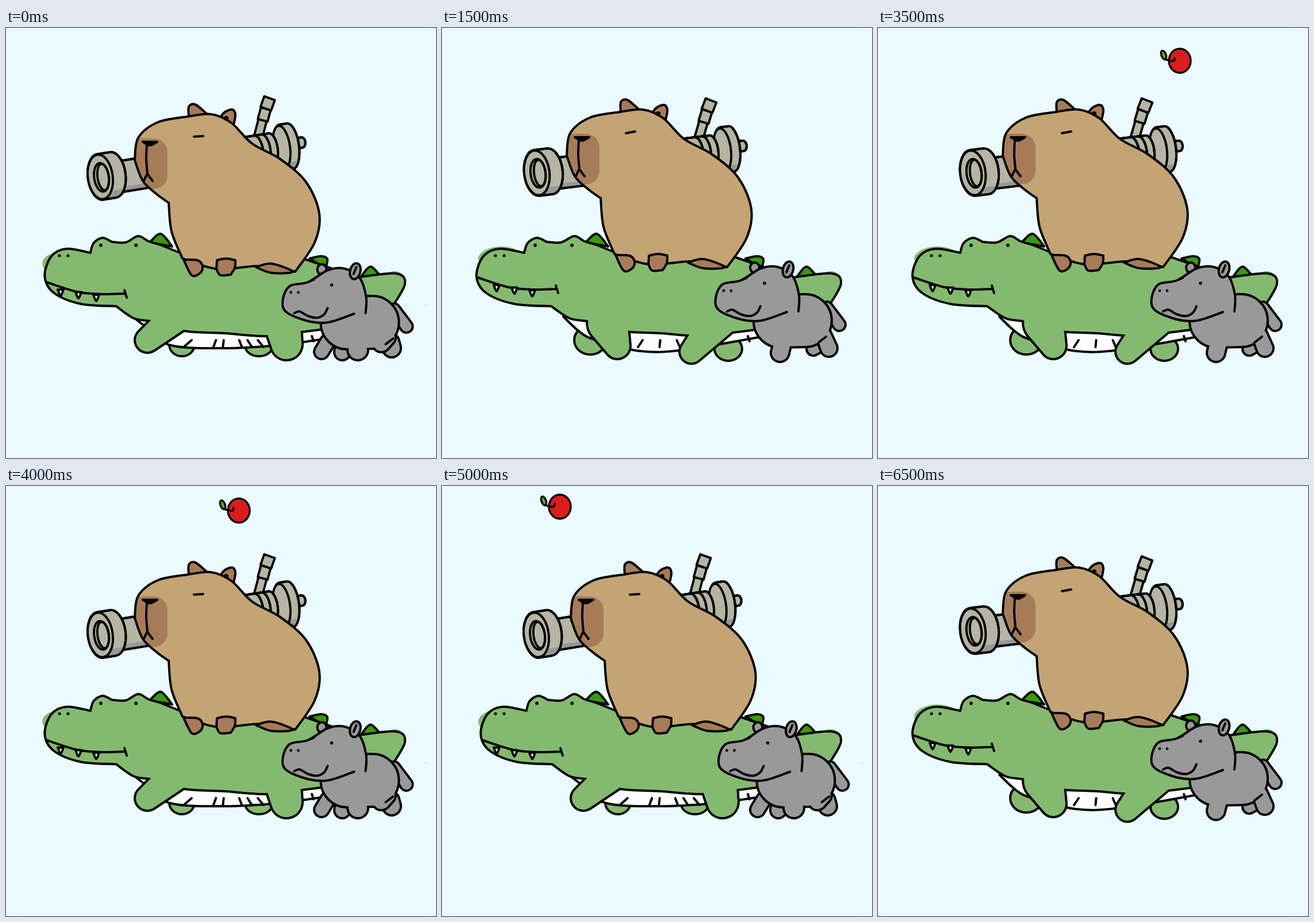
An HTML page with a canvas for the animation above (7 s loop, 748 by 748 pixels).

```html
<!DOCTYPE html>
<html lang="en">
<head>
<meta charset="utf-8">
<title>Animal parade</title>
<style>
html, body { margin: 0; width: 100%; height: 100%; overflow: hidden; background: #ebfaff; }
canvas { display: block; width: 748px; height: 748px; }
</style>
</head>
<body>
<canvas id="stage" width="748" height="748"></canvas>
<script>
const ctx = document.getElementById('stage').getContext('2d');
const SKY = '#ebfaff', INK = '#050505', TAN = '#c4a474', BROWN = '#a67c58';
const GREEN = '#84ba6f', SPIKE = '#3a9a0c', GREY = '#999999', METAL = '#b5b5a3', SHADE = '#98989a';
const STEP = 500, LOOP = 7000, PEN = 4;

// Two walking poses; limbs are x, y, radius at both ends.
const poses = [{
  shift: [7, 8], eyeLift: -2, sway: 10, mouth: 8,
  gun: [0.98, -0.036, 0.02, 1, -2.7, 13],
  belly: '216 499 246 522 287 552 380 557 470 552 560 540',
  ticks: [316, 363, 378, 408, 424, 443],
  farLegs: [[306, 551, 22, 20], [440, 553, 24, 18]],
  legs: [[292, 505, 28, 246, 543, 22], [482, 520, 32, 488, 550, 28]],
  hippo: [5.5, 3],
  hippoFar: [[560, 545, 13, 549, 563, 13], [672, 545, 12, 671, 557, 16], [586, 550, 13, 585, 564, 14]],
  hippoLegs: [[611, 545, 17, 612, 560, 18], [662, 538, 16, 653, 548, 16]]
}, {
  shift: [0, 0], eyeLift: 0, sway: 0, mouth: 0,
  gun: [1, 0, 0, 1, 0, 0],
  belly: '211 502 240 529 268 543 345 562 420 560 556 537',
  ticks: [345, 379, 411],
  farLegs: [[258, 543, 28, 25], [498, 558, 24, 21]],
  legs: [[288, 513, 36, 305, 553, 23], [482, 508, 32, 434, 563, 21]],
  hippo: [0, 0],
  hippoFar: [[655, 555, 10, 646, 558, 12]],
  hippoLegs: [[594, 540, 16, 588, 565, 16], [664, 535, 14, 673, 557, 15]]
}];

// Smooth curve through points; "/" marks a corner.
function curve(text, warp = p => p) {
  const path = new Path2D();
  let last = null;
  for (const part of text.split('/')) {
    const n = part.trim().split(/\s+/).map(Number);
    const p = last ? [last] : [];
    for (let i = 0; i < n.length; i += 2) p.push(warp([n[i], n[i + 1]]));
    if (!last) path.moveTo(...p[0]);
    for (let i = 0; i < p.length - 1; i++) {
      const a = p[i - 1] || p[i], b = p[i], c = p[i + 1], d = p[i + 2] || c;
      path.bezierCurveTo(b[0] + (c[0] - a[0]) / 6, b[1] + (c[1] - a[1]) / 6,
        c[0] - (d[0] - b[0]) / 6, c[1] - (d[1] - b[1]) / 6, c[0], c[1]);
    }
    last = p[p.length - 1];
  }
  return path;
}

function paint(path, color) {
  ctx.fillStyle = color;
  ctx.fill(path);
  ctx.stroke(path);
}

function shape(text, color, warp) {
  const path = curve(text, warp);
  path.closePath();
  paint(path, color);
}

function line(...texts) {
  for (const text of texts) ctx.stroke(curve(text));
}

function ellipse(x, y, rx, ry, turn = 0) {
  const path = new Path2D();
  path.ellipse(x, y, rx, ry, turn, 0, 7);
  return path;
}

function dot(x, y, r, color = INK) {
  ctx.fillStyle = color;
  ctx.fill(ellipse(x, y, r, r));
}

// Outline around two circles, grown by "pad".
function hull([x1, y1, r1, x2, y2, r2], pad = 0) {
  const turn = Math.atan2(y2 - y1, x2 - x1);
  const open = Math.acos((r1 - r2) / Math.hypot(x2 - x1, y2 - y1));
  const path = new Path2D();
  path.arc(x1, y1, r1 + pad, turn + open, turn - open + 2 * Math.PI);
  path.arc(x2, y2, r2 + pad, turn - open, turn + open);
  path.closePath();
  return path;
}

// Body and limbs joined into one silhouette.
function creature(body, limbs, color) {
  ctx.fillStyle = INK;
  for (const limb of limbs) ctx.fill(hull(limb, PEN / 2));
  paint(body, color);
  for (const limb of limbs) ctx.fill(hull(limb, -PEN / 2));
}

function placed(matrix, draw) {
  ctx.save();
  ctx.transform(...matrix);
  draw();
  ctx.restore();
}

function bar(x1, y1, x2, y2, w) {
  const d = Math.hypot(x2 - x1, y2 - y1);
  const dx = (y2 - y1) / d * w / 2, dy = (x1 - x2) / d * w / 2;
  shape(`${x1 - dx} ${y1 - dy} / ${x2 - dx} ${y2 - dy} / ${x2 + dx} ${y2 + dy} / ${x1 + dx} ${y1 + dy}`, METAL);
}

function cylinder(x1, x2, y, rx, ry) {
  const path = new Path2D(), q = Math.PI / 2;
  path.ellipse(x2, y, rx, ry, 0, -q, q);
  path.ellipse(x1, y, rx, ry, 0, q, 3 * q);
  path.closePath();
  paint(path, METAL);
  ctx.save();
  ctx.clip(path);
  ctx.fillStyle = SHADE;
  ctx.fillRect(x1, y + ry * 0.68, x2 - x1 + rx, ry);
  ctx.restore();
  ctx.stroke(path);
}

function launcher() {
  bar(446, 194, 455, 163, 15);
  bar(455, 164, 461, 144, 18);
  bar(461, 144, 468, 126, 20);
  ctx.translate(165, 252);
  ctx.rotate(-0.122);
  cylinder(350, 362, -3, 6, 9);
  cylinder(327, 340, 0, 16, 40);
  paint(ellipse(325, 0, 15, 38), METAL);
  for (const x of [306, 293, 280]) cylinder(250, x, 0, 12, 28);
  cylinder(24, 110, 5, 10, 27);
  cylinder(0, 23, 0, 22, 40);
  paint(ellipse(0, 0, 22, 39), METAL);
  paint(ellipse(2, 1, 13, 25), METAL);
  ctx.stroke(ellipse(5, 1, 10, 23));
}

function capybara(eyeLift) {
  shape('311 147 311 129 322 125 341 140 / 335 150', BROWN);
  shape('366 147 374 138 387 134 392 143 389 160', BROWN);
  const body = curve('217 222 223 183 257 156 310 146 350 142 385 157 421 193 470 220 515 260 538 315 530 365 496 416 / 475 411 430 406 360 411 300 393 / 281 346 276 296 / 255 281 231 258 217 222');
  ctx.fillStyle = TAN;
  ctx.fill(body);
  ctx.save();
  ctx.clip(body);
  ctx.fillStyle = BROWN;
  ctx.beginPath();
  ctx.roundRect(200, 184, 74, 88, 24);
  ctx.fill();
  ctx.restore();
  ctx.stroke(body);
  dot(376, 149, 4);
  shape('231 190 256 190 / 243 196 231 190', INK);
  line('238 195 237 220 239 245 / 233 257', '239 246 248 258', `320 ${183 + eyeLift} 336 180`);
  shape('302 395 326 396 335 406 331 418 316 422 302 395', BROWN);
  shape('360 396 376 393 392 396 / 391 409 384 421 / 366 422 359 411', BROWN);
  shape('428 408 455 402 492 416 455 418 428 408', BROWN);
}

function crocodile(pose) {
  const warp = ([x, y]) => [x + pose.sway * Math.max(0, 1 - x / 230), y];
  shape('250 373 269 358 289 380', SPIKE);
  shape('528 401 548 397 559 402 556 418', SPIKE);
  shape('618 432 634 415 651 431', SPIKE);
  ctx.fillStyle = GREEN;
  ctx.fill(ellipse(103, 402 + pose.mouth, 40, 22));
  ctx.fill(ellipse(676, 440, 18, 17));
  for (const leg of pose.farLegs) paint(ellipse(...leg), GREEN);
  shape(pose.belly + ' / 560 510', '#fff');
  for (const x of pose.ticks) {
    const lean = Math.max(-7, Math.min(5, (x - 385) / 10));
    line(`${x - lean} 543 ${x + lean} 555`);
  }
  line('532 536 535 545');
  const body = curve('300 390 268 377 / 248 371 230 362 207 373 182 372 / 165 365 149 374 143 391 / 100 384 72 397 60 432 77 461 126 480 190 484 / 222 505 256 511 310 527 380 531 450 536 505 530 560 523 / 672 485 / 694 445 678 427 610 434 / 560 416 508 398', warp);
  creature(body, pose.legs, GREEN);
  placed([1, 0, 0, 1, pose.mouth, pose.mouth], () =>
    line('62 434 116 451 160 455 199 454', '198 448 202 461'));
  for (let i = 0; i < 3; i++) {
    const x = 95 + 31 * i, y = 447 + 4.5 * i + pose.mouth;
    shape(`${x - 5} ${y} ${x} ${y + 11} ${x + 5} ${y}`, '#fff');
  }
  for (const x of [162, 226]) dot(warp([x, 0])[0], 378, 2.9);
  for (const x of [93, 108]) dot(x, 396, 2.6);
}

function hippo(pose) {
  const [dx, dy] = pose.hippo;
  const move = () => ctx.translate(dx, dy);
  ctx.save();
  move();
  paint(hull([670, 485, 9, 691, 516, 11]), GREY);
  ctx.restore();
  for (const leg of pose.hippoFar) paint(hull(leg), GREY);
  creature(hull([588 + dx, 510 + dy, 46, 632 + dx, 509 + dy, 46]), pose.hippoLegs, GREY);
  move();
  line('655 547 668 537');
  paint(ellipse(544, 417, 8, 9), GREY);
  const head = curve('620 493 621 465 610 432 585 416 555 418 520 439 488 446 476 470 482 491 520 507 555 509 600 494');
  paint(head, GREY);
  paint(ellipse(602, 420, 9, 14, 0.25), GREY);
  line('604 413 599 425', '496 493 505 490 520 498 536 501 548 495 554 484', '522 438 530 435');
  dot(561, 444, 2.8);
  for (const x of [490, 503]) dot(x, 457, 2.4);
}

// The apple crosses the sky in eight steps and tips over near the end.
function apple(n) {
  const tipped = n >= 5;
  const x = [720, 525, 405, 289, 205, 123, 65, -22][n];
  const y = (tipped ? 48 : 35) + 63 * 0.35 ** n;
  ctx.translate(x, y);
  ctx.rotate(tipped ? -0.66 : 0);
  ctx.lineWidth = 3.4;
  paint(ellipse(0, 0, 19, 21), '#da1c1c');
  paint(ellipse(-28, -10, 4, 8, -0.35), '#5fae2b');
  line('-24 -2 -16 0 -10 0 / -9 -5');
}

function draw(step) {
  const pose = poses[step % 2];
  ctx.fillStyle = SKY;
  ctx.fillRect(0, 0, 748, 748);
  ctx.strokeStyle = INK;
  ctx.lineWidth = PEN;
  ctx.lineCap = ctx.lineJoin = 'round';
  placed(pose.gun, launcher);
  crocodile(pose);
  placed([1, 0, 0, 1, ...pose.shift], () => capybara(pose.eyeLift));
  placed([1, 0, 0, 1, 0, 0], () => hippo(pose));
  if (step % 2 === 0) dot(730, 482, 1.4, '#cfdde2');
  if (step >= 6) placed([1, 0, 0, 1, 0, 0], () => apple(step - 6));
}

const start = performance.now();
let shown = -1;
function tick() {
  const step = Math.floor(((performance.now() - start) % LOOP) / STEP);
  if (step !== shown) draw(shown = step);
  requestAnimationFrame(tick);
}
tick();
</script>
</body>
</html>
```
